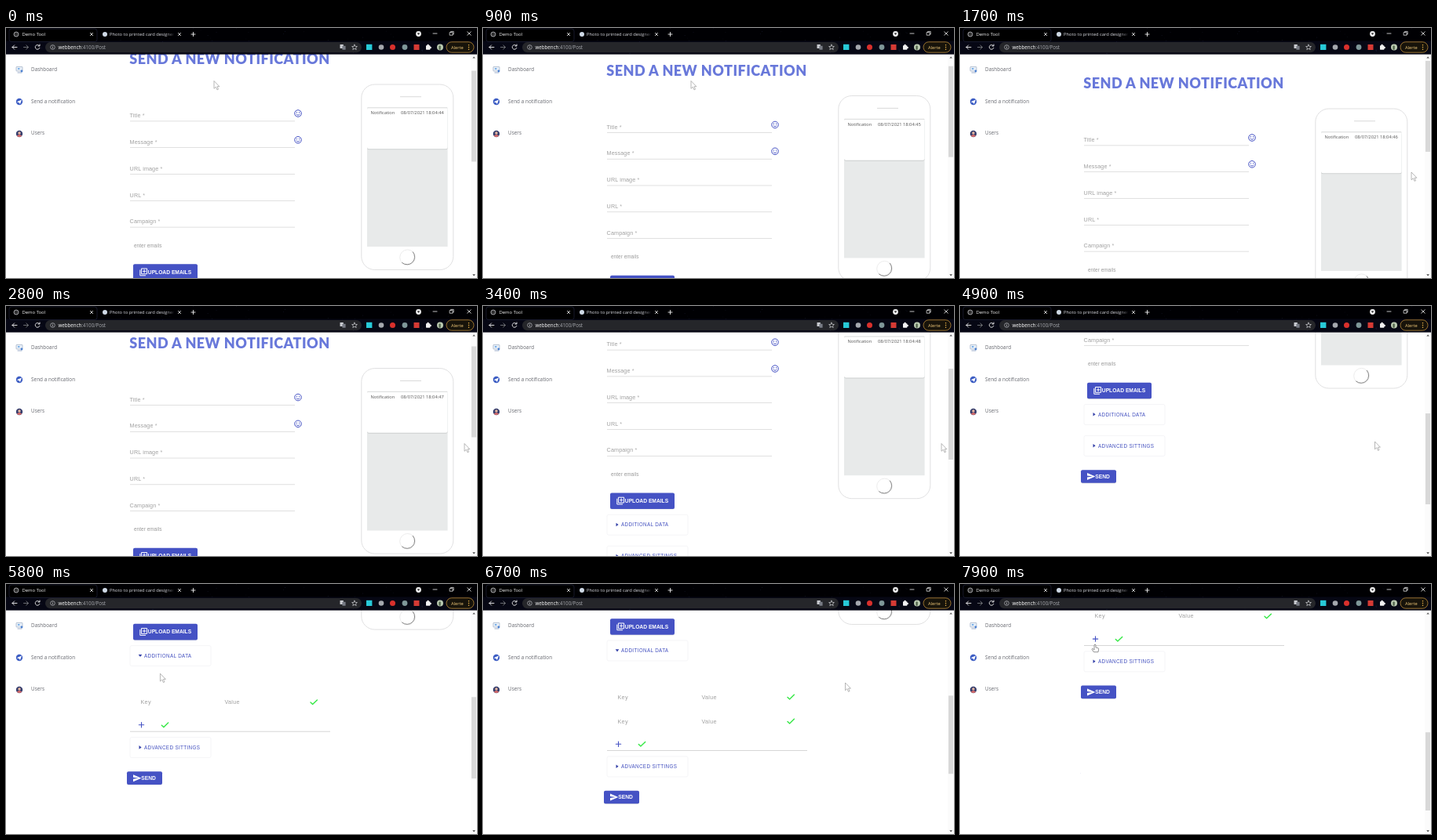
An HTML page that plays this animation: 600x319 px, repeating every 8 s.

```html
<!DOCTYPE html>
<html lang="en">
<head>
<meta charset="utf-8">
<title>Notification form</title>
<style>
html, body { margin: 0; width: 100%; height: 100%; overflow: hidden; background: #fff; }
svg { display: block; width: 100vw; height: 100vh; }
text { font-family: "Open Sans", "Noto Sans", sans-serif; white-space: pre; }
.form text { font-family: "Liberation Sans", Arial, sans-serif; }
.form .heading { font: 900 18px Lato, sans-serif; letter-spacing: .46px; fill: #6878da; }
.form .phone text { font-family: "Open Sans", "Noto Sans", sans-serif; fill: #555; }
.label { font-size: 7.2px; letter-spacing: .12px; fill: #a0a0a0; }
.pair { letter-spacing: .3px; }
.button { font-size: 6.7px; font-weight: 700; fill: #fff; }
.summary { font-size: 6.3px; letter-spacing: .35px; fill: #4552c0; }
.nav { font-size: 6.3px; letter-spacing: .08px; fill: #63656c; }
.line { fill: none; stroke-linecap: round; stroke-linejoin: round; }
</style>
</head>
<body>
<svg id="stage" viewBox="0 0 600 319" preserveAspectRatio="none"></svg>
<script>
const LOOP = 8000, STEP = 100, NOTCH = 46.9;
const BLUE = '#4552c4', GREEN = '#35e845';
const TRACK_TOP = 42, TRACK = 270, VIEW = 286, PAGE = 666;

const text = (x, y, s, attrs = '') => `<text x="${x}" y="${y}" ${attrs}>${s}</text>`;
const rect = (x, y, w, h, fill, attrs = '') =>
  `<rect x="${x}" y="${y}" width="${w}" height="${h}" fill="${fill}" ${attrs}/>`;
const circle = (x, y, r, fill, attrs = '') => `<circle cx="${x}" cy="${y}" r="${r}" fill="${fill}" ${attrs}/>`;
const line = (d, color, width = 1) => `<path class="line" d="${d}" stroke="${color}" stroke-width="${width}"/>`;
const shape = (d, fill) => `<path d="${d}" fill="${fill}"/>`;

const cross = (x, y, r, color) =>
  line(`M${x - r} ${y - r}l${2 * r} ${2 * r}m0 ${-2 * r}l${-2 * r} ${2 * r}`, color, .8);
const plus = (x, y, r, color, w) => line(`M${x - r} ${y}h${2 * r}M${x} ${y - r}v${2 * r}`, color, w);
const check = (x, y) => line(`M${x - 4} ${y + .4}l2.6 2.5l5.8-5.6`, GREEN, 1.4);

function field(label, y, smiley) {
  const face = circle(372, y - 2.4, 4.3, 'none', `stroke="${BLUE}" stroke-width="1"`) +
    circle(370.4, y - 3.6, .7, BLUE) + circle(373.6, y - 3.6, .7, BLUE) +
    line(`M369.8 ${y - 1.4}q2.2 2.8 4.4 0`, BLUE, .9);
  return text(157.6, y + 2.7, label + ' <tspan fill="#aaa">*</tspan>', 'class="label"') +
    rect(158, y + 7.2, 210, .6, '#cbcbcb') + (smiley ? face : '');
}

function button(x, y, w, h, label, textX) {
  return rect(x, y + .6, w, h, '#000', 'rx="2" opacity=".12"') + rect(x, y, w, h, BLUE, 'rx="2"') +
    text(textX, y + h / 2 + 2.4, label, 'class="button"');
}

const card = (y, label) =>
  rect(158, y, 103, 26, '#fff', 'rx="2" stroke="#f4f4f6" stroke-width=".9"') +
  text(176, y + 15.2, label, 'class="summary"');
const arrow = (id, y) => `<path id="${id}" d="M-1.5-2.3L1.6 0L-1.5 2.3z" transform="translate(171 ${y})" fill="#3440a8"/>`;
const pairRow = y => text(171.5, y + 2.6, 'Key', 'class="label pair"') +
  text(278.5, y + 2.6, 'Value', 'class="label pair"') + check(392, y);

function phone() {
  return rect(452.8, 103, 117, 236.5, '#fff', 'rx="17" stroke="#d8d8da" stroke-width=".8"') +
    rect(502, 118.4, 27, .8, '#cfcfcf') +
    rect(460, 132.5, 102.6, 177.5, '#e8eaea') +
    rect(460, 133.5, 102.6, 52.7, '#cdd0d0', 'rx="2.5"') +
    rect(460, 132.8, 102.6, 52.5, '#fff', 'rx="2.5"') +
    line('M461 132.8h100.6', '#d2d4d4', .8) +
    text(464.5, 141.2, 'Notification', 'font-size="5.7"') +
    text(503, 141.2, '', 'id="clock" font-size="5.75"') +
    circle(511.5, 323.7, 9.8, 'none', 'stroke="#e8e8e8" stroke-width=".8"') +
    line('M518.4 316.8A9.8 9.8 0 0 1 504.6 330.6', '#666', .8);
}

function page() {
  const uploadIcon = line('M172.8 338h6.8v6.8h-6.8zM170.8 340v6.8h6.8', '#fff', 1) +
    plus(176.2, 341.4, 1.8, '#fff', .9);
  return `<g id="page" class="form">
    ${text(157.3, 77.3, 'SEND A NEW NOTIFICATION', 'class="heading"')}
    ${['Title', 'Message', 'URL image', 'URL', 'Campaign']
      .map((name, i) => field(name, 142.4 + i * 33.8, i < 2)).join('')}
    ${text(163, 310.8, 'enter emails', 'font-size="6.4" letter-spacing=".05" fill="#999"')}
    ${button(162, 332.2, 82, 20.6, 'UPLOAD EMAILS', 180.8)}${uploadIcon}
    ${card(360, 'ADDITIONAL DATA')}${arrow('marker', 372.8)}
    <clipPath id="fold"><rect id="foldBox" x="150" y="386" width="280" height="0"/></clipPath>
    <g clip-path="url(#fold)">
      ${pairRow(432)}<g id="secondRow">${pairRow(463)}</g>
      <g id="actions">${plus(172.5, 492.2, 3.2, BLUE, 1.1)}${check(202.3, 492.2)}
        ${rect(158, 500.2, 255, .7, '#c4c4c4')}</g>
    </g>
    <g id="below">${card(400, 'ADVANCED SITTINGS')}${arrow('', 412.8)}
      ${button(154, 443.7, 45, 16.6, 'SEND', 172.3)}
      ${shape('M162 447.6l10.4 4.5l-10.4 4.5v-3.5l7-1l-7-1z', '#fff')}</g>
    <g class="phone">${phone()}</g>
  </g>`;
}

function sidebar() {
  return text(32, 54.6, 'Dashboard', 'class="nav"') + text(32, 95.5, 'Send a notification', 'class="nav"') +
    text(32, 136.3, 'Users', 'class="nav"') +
    rect(13, 49.4, 8, 5.6, '#eaf1f9', 'rx=".7" stroke="#8b9cb8" stroke-width=".6"') +
    rect(15, 51, 2.5, 2, '#7fb2e8') + line('M15 57h5', '#8598bd', .8) + circle(20, 55, 1.4, '#4a7fd0') +
    circle(17, 94, 4.2, '#3f5fc4') + shape('M13.8 94.2l6.2-2.6l-2 5.4l-1.4-1.8z', '#fff') +
    circle(17, 135, 4.2, '#363f6e') + circle(17, 134, 1.7, '#e8b7a0') +
    shape('M13.8 137.4q3.2-3 6.4 0q-3.2 3.4-6.4 0z', '#d56a6a');
}

function stars() {
  let seed = 7, out = '';
  const random = () => (seed = seed * 16807 % 2147483647) / 2147483647;
  for (let i = 0; i < 110; i++)
    out += circle((random() * 600).toFixed(1), (random() * 33).toFixed(1), .4, '#4a5590',
      `opacity="${(.1 + random() * .4).toFixed(2)}"`);
  return out;
}

function browser() {
  const gray = '#bfc1c5', white = '#f2f2f2';
  const tabs = rect(0, 0, 600, 33.4, '#000003') + rect(0, 16.5, 600, 16.9, '#060714') + stars() +
    rect(4, 1, 112, 16.5, '#000', 'rx="3" stroke="#20233c" stroke-width=".7"') +
    circle(13, 8, 3, '#333', `stroke="${gray}" stroke-width=".8"`) +
    text(20.5, 10.2, 'Demo Tool', `font-size="5.9" fill="${white}"`) + cross(109, 8, 1.7, white) +
    circle(126, 8, 3, '#cfd9e6') +
    text(132, 10.2, 'Photo to printed card designer', 'font-size="5.8" fill="url(#fade)"') +
    rect(214, 2, 12, 13, '#000003') + cross(221, 8, 1.7, white) + plus(238.5, 8, 2.5, white, .9);
  const windowKeys = circle(525.5, 7.5, 3.4, '#eee') + shape('M523.8 6.6h3.4l-1.7 2.2z', '#111') +
    line('M544 7h5', white, .8) + line('M565.5 5.6h3.6v3.6h-3.6zM566.6 5.4v-1h3.6v3.6h-1', white, .7) +
    cross(590, 7, 2.2, white);
  const address = line('M14 24.5h-6m2.6-2.6l-2.6 2.6l2.6 2.6', white, .9) +
    line('M22.5 24.5h6m-2.6-2.6l2.6 2.6l-2.6 2.6', '#77797d', .9) +
    line('M42.6 22.8a2.9 2.9 0 1 0 .3 2.6M43 21v2h-2', white, .9) +
    rect(50, 18, 403, 13.2, '#25262a', 'rx="6.6"') +
    circle(59.5, 24.5, 2.8, 'none', `stroke="${gray}" stroke-width=".7"`) + line('M59.5 24.3v1.5M59.5 23v.1', gray, .7) +
    text(66.5, 26.8, '<tspan fill="#fff">webbench</tspan>:4100/Post', 'font-size="6.2" fill="#a9abb0"') +
    rect(425.5, 21, 4.4, 5, '#c9cbd0', 'rx=".6"') + rect(428.4, 22.8, 4.2, 5, '#777b84', 'rx=".6"') +
    line('M444 21.2l1 2.2l2.4.2l-1.8 1.6l.6 2.4l-2.2-1.3l-2.2 1.3l.6-2.4l-1.8-1.6l2.4-.2z', '#d6d7da', .7);
  const extensions = rect(459, 20.8, 7.4, 7.2, '#27c9d8') + circle(478, 24.5, 3.3, '#a5a8ae') +
    circle(492.5, 24.5, 3.5, '#d9302c') + circle(508, 24.5, 3.4, '#7f9799') +
    rect(519.5, 21, 7, 7, '#d63a34') +
    rect(535, 22.3, 5.4, 5.4, white, 'rx=".6"') + circle(537.6, 22, 1.2, white) + circle(540.7, 25, 1.2, white) +
    circle(553, 24.5, 4, '#b9c9b0') + rect(551.5, 22.6, 2.2, 5.2, '#4b5f45', 'rx="1"') +
    rect(561, 17.8, 35, 13.4, '#17130a', 'rx="6.7" stroke="#b98a35" stroke-width=".8"') +
    text(567, 26.7, 'Alerte', 'font-size="5.7" fill="#f0c878"') +
    [21.8, 24.5, 27.2].map(y => circle(589.5, y, .75, '#f0b74c')).join('');
  return tabs + windowKeys + address + extensions;
}

const cursors = `
  <path id="pointer" d="M0 0V9.8L2.3 7.7L4 11.4L5.5 10.7L4 7.2H6.9z" fill="#fff" stroke="#999" stroke-width=".7"/>
  <path id="hand" d="M-1 .8Q0-.6 1 .8V4L4 4.8Q4.8 5 4.6 6.2L4 9.8H-1.6L-4 6.2Q-3.6 4.8-2.4 5.8L-1 7z"
    fill="#fff" stroke="#777" stroke-width=".8"/>`;

const scrollbar = rect(592, 33.4, 8, 285.6, '#fbfbfb') + rect(593, 0, 6, 116, '#d8d8d8', 'id="thumb"') +
  shape('M594.3 38.6h3.6l-1.8-2.2z', '#555') + shape('M594.3 314.2h3.6l-1.8 2.2z', '#444');

document.getElementById('stage').innerHTML =
  `<defs><linearGradient id="fade" gradientUnits="userSpaceOnUse" x1="204" x2="215">
    <stop stop-color="#d9dade"/><stop offset="1" stop-color="#d9dade" stop-opacity="0"/></linearGradient></defs>` +
  rect(0, 0, 600, 319, '#fff') + page() + sidebar() + scrollbar + browser() + cursors;

// Key points: time, then values.
const scrollKeys = [
  [0, 31], [100, NOTCH], [750, NOTCH], [1000, 0], [2600, 0], [3000, NOTCH], [3100, NOTCH], [3400, 2 * NOTCH],
  [3600, 2 * NOTCH], [3900, 3 * NOTCH], [4000, 3 * NOTCH], [4200, 4 * NOTCH], [4300, 4 * NOTCH], [4600, 5 * NOTCH],
  [5000, 5 * NOTCH], [5300, 6 * NOTCH], [6600, 6 * NOTCH], [6700, 288], [6800, 7 * NOTCH],
  [6850, 7 * NOTCH], [7000, 8 * NOTCH], [7100, 8 * NOTCH], [7400, 9 * NOTCH]];
const foldKeys = [[5500, 0], [5800, 77], [6200, 77], [6300, 108]];
const cursorKeys = [
  [0, 265, 67.5], [1300, 265, 67.5], [1700, 575, 184], [2100, 584, 175.5], [4300, 584, 175.5], [4900, 528.5, 173],
  [5000, 528.5, 173], [5500, 205, 92], [5700, 205, 92], [6000, 172, 178], [6300, 172, 178],
  [6700, 461.5, 126], [7100, 461.5, 126], [7800, 172, 77]];

function sample(keys, t) {
  const next = keys.findIndex(k => k[0] > t);
  if (next < 0) return keys[keys.length - 1].slice(1);
  if (next === 0) return keys[0].slice(1);
  const a = keys[next - 1], b = keys[next];
  const p = (t - a[0]) / (b[0] - a[0]), eased = p * p * (3 - 2 * p);
  return a.slice(1).map((v, i) => v + (b[i + 1] - v) * eased);
}

const el = id => document.getElementById(id);
const set = (id, attrs) => Object.entries(attrs).forEach(([k, v]) => el(id).setAttribute(k, v));
const show = (id, on) => set(id, { visibility: on ? 'visible' : 'hidden' });

function render(t) {
  const [scroll] = sample(scrollKeys, t), [fold] = sample(foldKeys, t), [x, y] = sample(cursorKeys, t);
  const ratio = TRACK / (PAGE + fold);
  set('page', { transform: `translate(0 ${-scroll})` });
  set('thumb', { y: TRACK_TOP + scroll * ratio, height: VIEW * ratio });
  set('foldBox', { height: fold && fold + 8 });
  set('actions', { transform: `translate(0 ${fold - 108})` });
  set('below', { transform: `translate(0 ${fold})` });
  set('marker', { transform: `translate(171 372.8) rotate(${fold > 0 ? 90 : 0})` });
  show('secondRow', fold > 100);
  el('clock').textContent = `08/07/2021 18:04:${44 + Math.floor((t + 600) / 1000)}`;

  const clickable = (t >= 5400 && t < 5800) || (t >= 5950 && t < 6350) || t >= 7750;
  show('hand', clickable);
  show('pointer', !clickable);
  set(clickable ? 'hand' : 'pointer', { transform: `translate(${x} ${y})` });
}

const start = performance.now();
function tick() {
  const t = (performance.now() - start) % LOOP;
  render(Math.floor(t / STEP) * STEP);
  requestAnimationFrame(tick);
}
tick();
</script>
</body>
</html>
```
